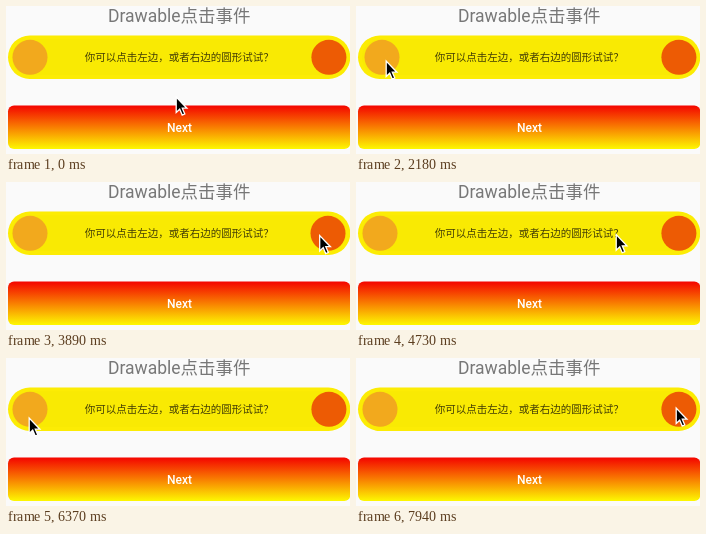
An HTML page for the animation above (8 s loop, 344 px wide and 148 px high).

```html
<!DOCTYPE html>
<html lang="zh">
<head>
<meta charset="utf-8">
<style>
  html, body { margin: 0; width: 100%; height: 100%; overflow: hidden; background: #fafafa; }
  svg { display: block; width: 344px; height: 148px; }
  text { font-family: Roboto, "Noto Sans CJK SC", "Noto Sans CJK", sans-serif; text-anchor: middle; }
</style>
</head>
<body>
<svg viewBox="0 0 344 148">
  <defs>
    <linearGradient id="fire" x2="0" y2="1">
      <stop stop-color="#f40400"/>
      <stop offset="1" stop-color="#fdf802"/>
    </linearGradient>
  </defs>
  <text x="173.3" y="16" font-size="17.5" fill="#777">Drawable点击事件</text>

  <rect x="2" y="29.5" width="342.3" height="43.5" rx="21.75" fill="#fcec04"/>
  <rect x="6" y="33.5" width="334.3" height="35.5" rx="17.75" fill="#f9ea03"/>
  <circle id="left" cx="24" cy="51.3" r="17.5" fill="#f2a91d"/>
  <circle id="right" cx="322.9" cy="51.3" r="17.5" fill="#ed5b04"/>
  <text x="173.2" y="55" font-size="10.5" fill="#443f06">你可以点击左边，或者右边的圆形试试？</text>

  <rect x="2" y="99.5" width="342.3" height="43.5" rx="6" fill="url(#fire)"/>
  <text x="173.5" y="125.8" font-size="12" font-weight="500" fill="#fff">Next</text>

  <path id="cursor" d="M.2 0V15.5l3.5-3.3 2.5 5.9 2.6-1.1-2.5-5.8h4.6z"
        fill="#000" stroke="#fff" stroke-width="1.3"/>
</svg>
<script>
  const LOOP = 8000, SHAKE_TIME = 400, SHAKE_PERIOD = 80;
  const easeOut = p => 1 - (1 - p) ** 2.75;
  const easeInOut = p => p * p * (3 - 2 * p);

  // Each move bends towards height bendY on its way to (x, y).
  const origin = { x: 170, y: 91 };
  const moves = [
    { from: 30, to: 710, x: 30, y: 56, bendY: 70, ease: easeOut },
    { from: 1009, to: 1010, x: 30, y: 55, bendY: 55, ease: easeInOut },
    { from: 2770, to: 3290, x: 313.5, y: 53.5, bendY: 147, ease: easeInOut },
    { from: 4520, to: 5290, x: 23, y: 60, bendY: 50, ease: easeInOut },
    { from: 6370, to: 6850, x: 315, y: 53, bendY: 85, ease: easeInOut },
    { from: 6850, to: 7110, x: 320, y: 50, bendY: 51, ease: easeInOut },
  ];
  const shakes = { left: [2160, 5790], right: [3845, 7540] };

  const place = (id, x, y) =>
    document.getElementById(id).setAttribute("transform", `translate(${x} ${y})`);

  function cursorAt(time) {
    let start = origin;
    for (const move of moves) {
      if (time < move.from) break;
      if (time < move.to) {
        const p = move.ease((time - move.from) / (move.to - move.from)), q = 1 - p;
        return {
          x: q * start.x + p * move.x,
          y: q * q * start.y + 2 * p * q * move.bendY + p * p * move.y,
        };
      }
      start = move;
    }
    return start;
  }

  function shakeAt(time, starts) {
    const start = starts.find(s => time >= s && time < s + SHAKE_TIME);
    return start === undefined ? 0 : 2 * Math.sin((time - start) / SHAKE_PERIOD * 2 * Math.PI);
  }

  function draw() {
    const time = performance.now() % LOOP;
    const { x, y } = cursorAt(time);
    place("cursor", x, y);
    for (const id in shakes) place(id, shakeAt(time, shakes[id]), 0);
    requestAnimationFrame(draw);
  }
  draw();
</script>
</body>
</html>
```
